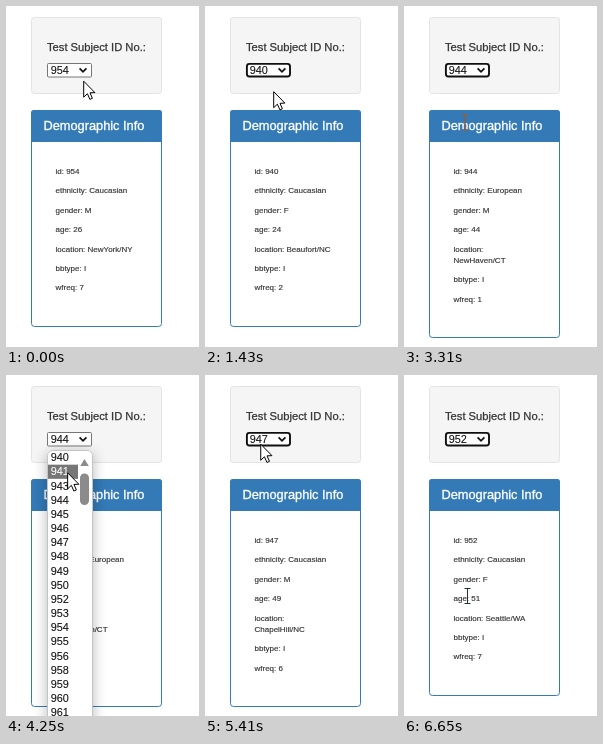
Recreate the animation shown at these times as an HTML page with a canvas. Size 193 px wide and 341 px high, loop 6700 ms.

```html
<!DOCTYPE html>
<html lang="en">
<head>
<meta charset="utf-8">
<title>Demographic Info</title>
<style>
  html, body { margin: 0; width: 100%; height: 100%; overflow: hidden; background: #fff; }
  canvas { display: block; width: 193px; height: 341px; }
</style>
</head>
<body>
<canvas id="stage"></canvas>
<script>
const W = 193, H = 341, LOOP = 6700;
const canvas = document.getElementById('stage');
const ctx = canvas.getContext('2d');
const scale = window.devicePixelRatio || 1;
canvas.width = W * scale;
canvas.height = H * scale;

const FONT = '"Liberation Sans", Arial, sans-serif';
const BLUE = '#337ab7';
const ROW = 14.17, LIST_TOP = 75.5, LINE = 11.43, TEXT_WIDTH = 80;

// Subject numbers run on from 940, with a few missing
const missing = [942, 951, 957];
const ids = Array.from({ length: 22 }, (_, i) => 940 + i).filter(id => !missing.includes(id));

const person = (id, ethnicity, gender, age, location, wfreq) =>
  ({ id, ethnicity, gender, age, location, bbtype: 'I', wfreq });
const first = person(954, 'Caucasian', 'M', 26, 'NewYork/NY', 7);

// Each use of the menu: opened, closed, chosen subject
const visits = [
  { open: 360, close: 1360, who: person(940, 'Caucasian', 'F', 24, 'Beaufort/NC', 2) },
  { open: 2160, close: 2910, who: person(944, 'European', 'M', 44, 'NewHaven/CT', 1) },
  { open: 3850, close: 4810, who: person(947, 'Caucasian', 'M', 49, 'ChapelHill/NC', 6) },
  { open: 5590, close: 6520, who: person(952, 'Caucasian', 'F', 51, 'Seattle/WA', 7) }
];

// Pointer goals; travel time follows from the distance
const goal = (start, x, y) => ({ start, x, y });
const goals = [
  goal(70, 73, 63), goal(840, 69, 85.5), goal(1690, 69, 68),
  goal(2170, 73, 76), goal(2400, 61, 124), goal(3210, 61, 67),
  goal(4010, 64, 162), goal(4810, 56, 68.5), goal(5600, 63.5, 221)
];

function pointerAt(t) {
  let { x, y } = goal(0, 78, 75);
  for (const g of goals) {
    if (t < g.start) break;
    const dx = g.x - x, dy = g.y - y;
    const time = Math.min(640, 160 + 5 * Math.hypot(dx, dy));
    const u = Math.min(1, (t - g.start) / time);
    const k = u * u * (3 - 2 * u);
    x += dx * k;
    y += dy * k;
  }
  return { x, y };
}

function stateAt(t) {
  const s = { id: first.id, shown: first, open: false, focus: false };
  for (const v of visits) {
    if (t < v.open) break;
    s.open = t < v.close;
    s.focus = !s.open;
    if (s.focus) s.id = v.who.id;
    if (t >= v.close + 70) s.shown = v.who;
  }
  return s;
}

// A hairline stroke gives the slightly heavy look of screen text
function text(str, x, y, size, color, weight = 0.25) {
  ctx.font = size + 'px ' + FONT;
  ctx.fillStyle = ctx.strokeStyle = color;
  ctx.lineWidth = weight;
  ctx.fillText(str, x, y);
  ctx.strokeText(str, x, y);
}

function box(x, y, w, h, r, fill, stroke, width = 1) {
  ctx.beginPath();
  ctx.roundRect(x, y, w, h, r);
  if (fill) { ctx.fillStyle = fill; ctx.fill(); }
  if (stroke) { ctx.strokeStyle = stroke; ctx.lineWidth = width; ctx.stroke(); }
}

function poly(points, close) {
  ctx.beginPath();
  points.forEach(([x, y]) => ctx.lineTo(x, y));
  if (close) ctx.closePath();
}

function drawSelector(s) {
  box(25.5, 11.5, 130, 76, 3, '#f5f5f5', '#e3e3e3');
  text('Test Subject ID No.:', 41, 45, 11.2, '#333');
  if (s.focus) box(41.9, 57.9, 43.1, 12.6, 2.5, '#fff', '#101010', 1.9);
  else box(41.5, 57.5, 44, 13.5, 1, '#fff', '#767676');
  text(s.id, 44.7, 68, 10.9, '#111', 0.1);
  poly([[73.6, 62.4], [77, 65.8], [80.4, 62.4]]);
  ctx.strokeStyle = '#111';
  ctx.lineWidth = 1.8;
  ctx.stroke();
}

// Panel text, with the location broken in two when it is too wide
function panelLines(who) {
  ctx.font = '8px ' + FONT;
  return Object.entries(who).map(([name, value]) => {
    const whole = name + ': ' + value;
    return ctx.measureText(whole).width > TEXT_WIDTH ? [name + ':', value] : [whole];
  });
}

function drawPanel(who) {
  const items = panelLines(who);
  const extra = items.flat().length - items.length;
  box(25.5, 104.5, 130, 216 + Math.floor(extra * LINE), 3, '#fff', BLUE);
  box(25, 104, 131, 32, [3, 3, 0, 0], BLUE);
  text('Demographic Info', 37.4, 124, 12.8, '#fff', 0.35);

  let y = 167.9;
  for (const lines of items) {
    for (const line of lines) {
      text(line, 49.5, Math.round(y), 8, '#333', 0.15);
      y += LINE;
    }
    y += 8;
  }
}

function drawMenu(s, y) {
  const active = y >= LIST_TOP ? Math.floor((y - LIST_TOP) / ROW) : ids.indexOf(s.id);
  ctx.save();
  ctx.shadowColor = 'rgba(0,0,0,0.28)';
  ctx.shadowBlur = 14 * scale;
  ctx.shadowOffsetY = 3 * scale;
  box(41, 75, 46, 300, 5, '#fff');
  ctx.restore();
  box(41.5, 75.5, 45, 300, 5, null, '#c4c4c4');

  ctx.save();
  ctx.beginPath();
  ctx.roundRect(42, 75.5, 44.5, 300, 4.5);
  ctx.clip();
  ids.forEach((id, i) => {
    const top = LIST_TOP + i * ROW;
    if (i === active) {
      ctx.fillStyle = '#767676';
      ctx.fillRect(42, top, 30, ROW);
    }
    text(id, 44.7, Math.round(top + 10.7), 10.9, i === active ? '#fff' : '#111', 0.1);
  });
  ctx.restore();

  poly([[78.5, 84], [82.8, 91], [74.2, 91]], true);
  ctx.fillStyle = '#8b8b8b';
  ctx.fill();
  box(74, 98.5, 9, 31.5, 4.5, '#8b8b8b');
}

function drawArrow(x, y) {
  ctx.save();
  ctx.translate(x - 0.3, y + 0.2);
  poly([[0, 0], [0, 16], [3.7, 12.5], [6.2, 18.2], [8.7, 17.1], [6.3, 11.6], [11.2, 11.4]], true);
  ctx.fillStyle = '#fff';
  ctx.fill();
  ctx.strokeStyle = '#000';
  ctx.lineWidth = 1;
  ctx.stroke();
  ctx.restore();
}

// The text pointer inverts what lies under it
function drawBeam(x, y) {
  ctx.save();
  ctx.translate(x, y);
  ctx.globalCompositeOperation = 'difference';
  ctx.strokeStyle = '#e0d0c0';
  ctx.lineWidth = 1;
  ctx.beginPath();
  ctx.moveTo(0, -7);
  ctx.lineTo(0, 7);
  for (const end of [-7.5, 7.5]) {
    ctx.moveTo(-3, end);
    ctx.lineTo(3, end);
  }
  ctx.stroke();
  ctx.restore();
}

function draw(t) {
  const s = stateAt(t), p = pointerAt(t);
  ctx.setTransform(scale, 0, 0, scale, 0, 0);
  ctx.fillStyle = '#fff';
  ctx.fillRect(0, 0, W, H);
  drawSelector(s);
  drawPanel(s.shown);
  if (s.open) drawMenu(s, p.y);
  const overText = !s.open && (p.y > 157 || (p.y > 111 && p.y < 128));
  (overText ? drawBeam : drawArrow)(p.x, p.y);
}

const start = performance.now();
function tick() {
  draw((performance.now() - start) % LOOP);
  requestAnimationFrame(tick);
}
tick();
</script>
</body>
</html>
```
